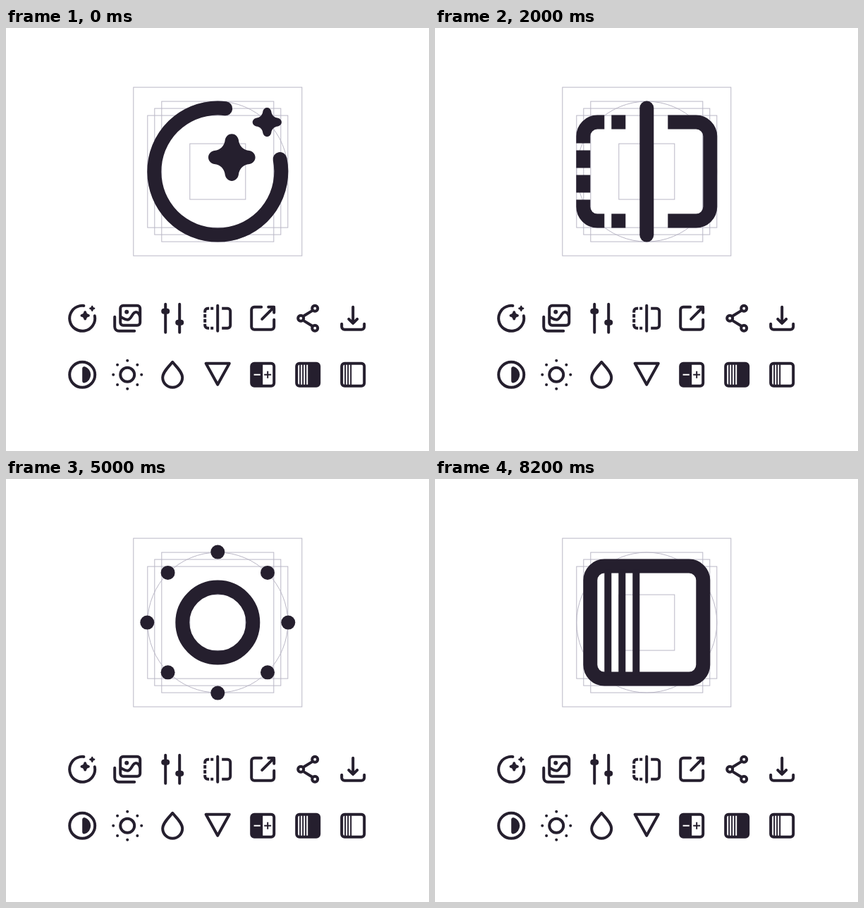
Recreate the animation shown at these times as an HTML page with a canvas. Size 600 by 600 pixels, loop 8800 ms.

```html
<!DOCTYPE html>
<html lang="en">
<head>
<meta charset="utf-8">
<title>Icon grid</title>
<style>
  html, body { margin: 0; width: 100%; height: 100%; overflow: hidden; background: #fff; }
  canvas { display: block; width: 600px; height: 600px; }
</style>
</head>
<body>
<canvas id="stage" width="600" height="600"></canvas>
<script>
const ctx = document.getElementById('stage').getContext('2d');
const INK = '#251f2e';
const GUIDE = '#bab7c6';
const LOOP = 8800;
const STARTS = [0, 800, 1400, 2000, 2600, 3200, 3800, 4400, 5000, 5600, 6200, 6800, 7400, 8200];

// Icons live on a 24-unit grid centred on 0,0.
function line(d, width = 2, cap = 'round') {
  ctx.lineWidth = width;
  ctx.lineCap = cap;
  ctx.lineJoin = 'round';
  ctx.stroke(new Path2D(d));
}

function fill(d, rule) {
  ctx.fill(new Path2D(d), rule);
}

function ring(x, y, r, from = 0, to = Math.PI * 2) {
  ctx.beginPath();
  ctx.arc(x, y, r, from, to);
  ctx.lineWidth = 2;
  ctx.lineCap = 'round';
  ctx.stroke();
}

function dot(x, y, r) {
  ctx.beginPath();
  ctx.arc(x, y, r, 0, Math.PI * 2);
  ctx.fill();
}

function frame(x, y, size) {
  ctx.beginPath();
  ctx.roundRect(x, y, size, size, 2);
  ctx.lineWidth = 2;
  ctx.stroke();
}

function star(x, y, scale) {
  ctx.save();
  ctx.translate(x, y);
  ctx.scale(scale, scale);
  ctx.beginPath();
  ctx.moveTo(0, -3.33);
  for (let i = 0; i < 4; i++) {
    ctx.bezierCurveTo(0.45, -3.33, 0.85, -3, 0.95, -2.5);
    ctx.bezierCurveTo(1.05, -1.6, 1.6, -1.05, 2.5, -0.95);
    ctx.bezierCurveTo(3, -0.85, 3.33, -0.45, 3.33, 0);
    ctx.rotate(Math.PI / 2);
  }
  ctx.fill();
  ctx.restore();
}

function magic() {
  ring(0, 0, 9, -0.196, Math.PI * 2 - 1.449);
  star(2, -2, 1);
  star(7, -7, 0.62);
}

function gallery() {
  frame(-5, -9, 14);
  dot(-0.5, -4.5, 1.5);
  line('M-5-1.1C-3.3-.4-2 1 0 1C3 1 3.3-4.4 6-4.4C7.6-4.4 8.6-2.6 9-.9', 2, 'butt');
  line('M-9-1V6A3 3 0 0 0-6 9H5');
}

function sliders() {
  line('M-5-10V10M5-10V10');
  line('M-6-5H-4M4 3H6', 4);
}

function compare() {
  line('M0-9V9');
  line('M3-7H7A2 2 0 0 1 9-5V5A2 2 0 0 1 7 7H3', 2, 'butt');
  line('M-6-7H-7A2 2 0 0 0-9-5V-4M-9 4V5A2 2 0 0 0-7 7H-6', 2, 'butt');
  line('M-5-7H-3M-5 7H-3M-9-3V-.5M-9 .5V3', 2, 'butt');
}

function openOut() {
  line('M-1-8H-6A2 2 0 0 0-8-6V6A2 2 0 0 0-6 8H6A2 2 0 0 0 8 6V1');
  line('M-.5 .5L8-8M4-8H8V-4');
}

function share() {
  ring(5, -7, 2);
  ring(-5, 0, 2);
  ring(5, 7, 2);
  line('M-3-1.65L3-5.35M-3 1.65L3 5.35', 2, 'butt');
}

function download() {
  line('M-8 4V6A2 2 0 0 0-6 8H6A2 2 0 0 0 8 6V4');
  line('M0-8V3.5M-3 .5L0 3.5L3 .5');
}

function contrast() {
  ring(0, 0, 9);
  fill('M0-4.3C0-5.4 .8-6.03 1.8-5.72A6 6 0 0 1 1.8 5.72C.8 6.03 0 5.4 0 4.3Z');
}

function sun() {
  ring(0, 0, 5);
  for (let i = 0; i < 8; i++) {
    const a = i * Math.PI / 4;
    dot(10 * Math.cos(a), 10 * Math.sin(a), 1);
  }
}

function drop() {
  line('M0-9C-2.5-6-7-2-7 2A7 7 0 0 0 7 2C7-2 2.5-6 0-9Z');
}

function triangle() {
  line('M-8.3-8H8.3L0 7Z');
}

function exposure() {
  frame(-8, -8, 16);
  fill('M-7.5-7.5H0V7.5H-7.5ZM-6.3-.5H-1.7V.5H-6.3Z', 'evenodd');
  line('M1 0H6M3.5-2.5V2.5', 1, 'butt');
}

function stripes() {
  frame(-8, -8, 16);
  line('M-5.5-7.5V7.5M-3.5-7.5V7.5M-1.5-7.5V7.5', 1, 'butt');
}

function halfStripes() {
  stripes();
  fill('M0-7.5H7.5V7.5H0Z');
}

const ICONS = [
  magic, gallery, sliders, compare, openOut, share, download,
  contrast, sun, drop, triangle, exposure, halfStripes, stripes
];

function place(icon, x, y, scale) {
  ctx.save();
  ctx.translate(x, y);
  ctx.scale(scale, scale);
  ctx.strokeStyle = ctx.fillStyle = INK;
  icon();
  ctx.restore();
}

function guides(x, y) {
  ctx.save();
  ctx.translate(x, y);
  ctx.strokeStyle = GUIDE;
  ctx.lineWidth = 1;
  for (const [w, h] of [[240, 240], [200, 160], [160, 200], [180, 180], [80, 80]]) {
    ctx.strokeRect(0.5 - w / 2, 0.5 - h / 2, w - 1, h - 1);
  }
  ctx.beginPath();
  ctx.arc(0, 0, 99.5, 0, Math.PI * 2);
  ctx.stroke();
  ctx.restore();
}

function draw(t) {
  ctx.fillStyle = '#fff';
  ctx.fillRect(0, 0, 600, 600);
  guides(300.3, 203.6);
  const current = STARTS.filter(s => s <= t).length - 1;
  place(ICONS[current], 300.3, 203.6, 10);
  ICONS.forEach((icon, i) => {
    place(icon, 108.2 + 64 * (i % 7), 411.8 + 80 * Math.floor(i / 7), 2);
  });
}

const begin = performance.now();
function tick() {
  draw((performance.now() - begin) % LOOP);
  requestAnimationFrame(tick);
}
tick();
</script>
</body>
</html>
```
